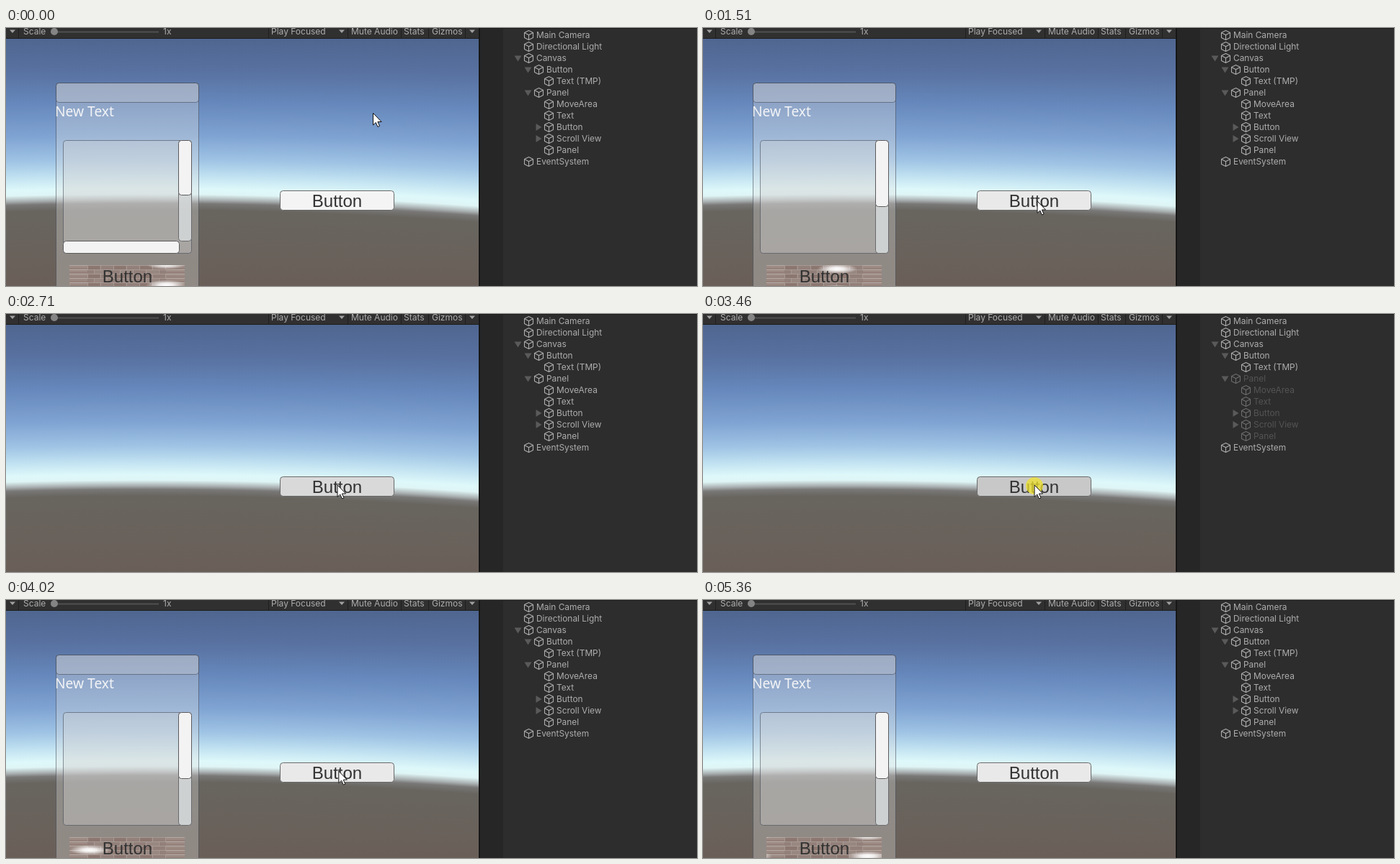
An HTML page with a canvas that plays this animation: 959 px wide and 359 px high, repeating every 5.43 s.

```html
<!DOCTYPE html>
<html lang="en">
<head>
<meta charset="utf-8">
<title>Panel toggle</title>
<style>
  html, body { margin: 0; width: 100%; height: 100%; overflow: hidden; background: #2d2d2d; }
  canvas, svg { position: absolute; left: 0; top: 0; display: block; }
  .ui { font: 12px Inter, sans-serif; fill: #adadad; }
  .tree { font-size: 11.9px; }
  .label { font: 24px "Liberation Sans", Arial, sans-serif; fill: #323232; text-anchor: middle; }
  .title { font: 300 19.2px "Noto Sans", sans-serif; fill: #f2f4f6; }
  .cube { fill: none; stroke: #adadad; stroke-width: 1.1; stroke-linejoin: round; }
  .tri { fill: #5a5a5a; }
  .off text { fill: #545454; }
  .off .cube { stroke: #6c6c6c; }
  .edge { stroke: #3c4450; stroke-opacity: .55; }
  .bar { fill: #f4f3f4; stroke: #5a5a5c; }
  .track { fill: #d3d6d6; fill-opacity: .9; stroke: #6a6a6c; }
</style>
</head>
<body>
<canvas id="sky" width="656" height="359"></canvas>
<svg width="959" height="359" viewBox="0 0 959 359">
  <defs>
    <radialGradient id="shine">
      <stop offset="0" stop-color="#fff"/>
      <stop offset=".35" stop-color="#fff" stop-opacity=".85"/>
      <stop offset="1" stop-color="#fff" stop-opacity="0"/>
    </radialGradient>
    <pattern id="bricks" x="113" y="330" width="36" height="12" patternUnits="userSpaceOnUse">
      <rect width="36" height="12" fill="#93807a"/>
      <rect x="1" y="1" width="16" height="5" fill="#8c7770"/>
      <rect x="10" y="7" width="16" height="5" fill="#998882"/>
      <path d="M0 .5H36M0 6.5H36M.5 0V6M18.5 0V6M9.5 6V12M27.5 6V12" stroke="#ada19a" stroke-opacity=".75"/>
    </pattern>
    <pattern id="planks" x="88" y="330" width="30" height="6" patternUnits="userSpaceOnUse">
      <rect width="30" height="6" fill="#9c8a83"/>
      <path d="M0 .5H30" stroke="#b3a8a2"/>
      <path d="M0 4.5H30" stroke="#917d76"/>
    </pattern>
    <clipPath id="face"><rect x="88" y="330" width="160" height="29"/></clipPath>
  </defs>

  <g id="panel">
    <rect class="edge" x="69.5" y="76.5" width="198" height="300" rx="4" fill="#dcdcdc" fill-opacity=".33"/>
    <rect class="edge" x="69.5" y="76.5" width="198" height="27" rx="4" fill="#d2d2d2" fill-opacity=".3"/>
    <text class="title" x="68" y="123">New Text</text>
    <rect class="edge" x="79.5" y="156.5" width="178" height="157" rx="4" fill="#d2d2d2" fill-opacity=".36"/>
    <rect id="track" class="track" x="239.5" y="156.5" width="18" height="157" rx="4"/>
    <rect id="vbar" class="bar" x="239.5" y="156.5" width="18" height="92" rx="4"/>
    <rect id="hbar" class="bar" x="79.5" y="296.5" width="161" height="17" rx="4"/>
    <g clip-path="url(#face)">
      <rect x="88" y="330" width="160" height="29" fill="url(#planks)"/>
      <rect x="113" y="330" width="109" height="29" fill="url(#bricks)"/>
      <g id="glare"></g>
    </g>
    <text class="label" x="168.5" y="353.5">Button</text>
  </g>

  <rect id="button" x="380.5" y="226.5" width="158" height="27" rx="4" stroke="#68696a"/>
  <text class="label" x="459.5" y="248.5">Button</text>

  <rect width="656" height="14" fill="#303030"/>
  <rect y="14" width="656" height="1" fill="#1e1e1e"/>
  <path d="M17.5 0V14M364.5 0V14M474.5 0V14M548.5 0V14M586.5 0V14M637.5 0V14" stroke="#1f1f1f"/>
  <path d="M5 2.5h8l-4 4.5zM462 2.5h8l-4 4.5zM643 2.5h8l-4 4.5z" fill="#a0a0a0"/>
  <path d="M62 5.5H212" stroke="#505050" stroke-width="2"/>
  <circle cx="67" cy="5" r="5" fill="#848484"/>
  <g id="tools" class="ui"></g>

  <rect x="656" width="303" height="359" fill="#2d2d2d"/>
  <rect x="656" width="34" height="359" fill="#262626"/>
  <rect x="656" width="2" height="359" fill="#171717"/>
  <rect x="658" width="301" height="1" fill="#1c1c1c"/>
  <g id="tree" class="ui tree"></g>

  <circle id="click" cx="460" cy="239" r="12" fill="#efe22c" fill-opacity=".75"/>
  <path id="cursor" d="M0 0V16.5L3.8 13 6.4 19 9 17.9 6.4 12H11.6Z" fill="#fff" stroke="#111" stroke-linejoin="round"/>
</svg>
<script>
const LOOP = 5430, HOLD = 530, RESUME = 3390, STEP = 70.35;
const $ = id => document.getElementById(id);

function add(parent, tag, attrs, text) {
  const el = document.createElementNS('http://www.w3.org/2000/svg', tag);
  for (const k in attrs) el.setAttribute(k, attrs[k]);
  if (text) el.textContent = text;
  return parent.appendChild(el);
}

// Sky and ground follow a slightly curved horizon.
function drawSky() {
  const ctx = $('sky').getContext('2d');
  const sky = [[0, '#4f6690'], [.2, '#5871a0'], [.4, '#6688bc'], [.6, '#7fa3d2'],
    [.75, '#9ec3e4'], [.86, '#c4e4f2'], [.93, '#def8fa'], [.965, '#dff5f6'], [1, '#a9afb0']];
  for (let x = 0; x < 656; x++) {
    const h = 239 + 8e-5 * (x - 190) ** 2;
    const g = ctx.createLinearGradient(0, 15, 0, 359);
    const stop = (y, c) => g.addColorStop((y - 15) / 344, c);
    for (const [f, c] of sky) stop(15 + (h - 15) * f, c);
    stop(h + 5, '#797877');
    stop(h + 14, '#68655f');
    stop(359, '#6a5f58');
    ctx.fillStyle = g;
    ctx.fillRect(x, 15, 1, 344);
  }
}

function buildTools() {
  const items = [[24, 'Scale'], [218, '1x'], [368, 'Play Focused'], [479, 'Mute Audio'], [552, 'Stats'], [591, 'Gizmos']];
  for (const [x, s] of items) add($('tools'), 'text', { x, y: 9 }, s);
}

// Each row: depth, name, arrow (v open, > closed), belongs to the toggled panel.
function buildTree() {
  const rows = [
    [0, 'Main Camera'], [0, 'Directional Light'], [0, 'Canvas', 'v'], [1, 'Button', 'v'], [2, 'Text (TMP)'],
    [1, 'Panel', 'v', 1], [2, 'MoveArea', '', 1], [2, 'Text', '', 1], [2, 'Button', '>', 1],
    [2, 'Scroll View', '>', 1], [2, 'Panel', '', 1], [0, 'EventSystem']
  ];
  const arrows = { v: 'M-5 -3.5H5L0 4.5Z', '>': 'M-3 -5V5L5 0Z' };
  rows.forEach(([depth, name, arrow, member], i) => {
    const row = add($('tree'), 'g', { transform: `translate(${725.5 + 14 * depth} ${10 + 16 * i})` });
    if (member) row.classList.add('member');
    add(row, 'path', { class: 'cube', d: 'M0 -6.5L6 -3.5V3.5L0 6.5L-6 3.5V-3.5ZM-6 -3.5L0 -.3L6 -3.5M0 -.3V6.5' });
    add(row, 'text', { x: 10.5, y: 4 }, name);
    if (arrow) add(row, 'path', { class: 'tri', d: arrows[arrow], transform: 'translate(-15 0)' });
  });
}

// Linear interpolation over rows of [time, ...values].
function at(keys, t) {
  let i = keys.findIndex(k => k[0] > t);
  if (i < 0) return keys[keys.length - 1].slice(1);
  i = Math.max(i, 1);
  const a = keys[i - 1], b = keys[i], f = (t - a[0]) / (b[0] - a[0]);
  return a.slice(1).map((v, n) => v + (b[n + 1] - v) * f);
}

const pointer = [[0, 509.5, 118.5], [530, 509.5, 118.5], [740, 504, 150], [880, 491, 188], [1020, 478, 221],
  [1230, 464, 241], [1650, 464, 241], [1860, 460, 238], [4020, 460, 238], [4160, 540, 246],
  [4300, 690, 256], [4450, 807, 260], [4660, 872, 290], [4800, 879, 325], [4940, 878, 362]];
const tint = [[0, 244], [1020, 244], [1160, 233], [2430, 233], [2570, 200], [2640, 200], [2780, 233],
  [3390, 233], [3460, 200], [3600, 200], [3740, 233]];
const between = (t, a, b) => t >= a && t < b;
const show = (el, on) => el.style.display = on ? '' : 'none';

drawSky();
buildTools();
buildTree();
const members = document.querySelectorAll('.member');
const shines = Array.from({ length: 9 }, () => add($('glare'), 'ellipse', { rx: 28, ry: 7, fill: 'url(#shine)' }));

function snap(t) {
  if (t < HOLD) return 0;
  const base = t < RESUME ? HOLD : RESUME;
  return base + Math.floor((t - base + 8) / STEP) * STEP;
}

function render(time) {
  const t = snap(time);

  // The highlight scrolls left and down, wrapping like a tiled texture.
  const turn = t < HOLD ? .78 : .972 * (t - 1510) / 1000 + 2;
  const phase = turn % 1;
  shines.forEach((s, i) => {
    s.setAttribute('cx', 187 - 160 * phase + 160 * (i % 3 - 1));
    s.setAttribute('cy', 335 + 29 * phase + 29 * (Math.floor(i / 3) - 1));
  });

  const first = t < HOLD;
  show($('hbar'), first);
  $('vbar').setAttribute('height', first ? 76 : 92);
  $('track').setAttribute('height', first ? 140 : 157);

  show($('panel'), !between(t, 2640, 3600));
  members.forEach(m => m.classList.toggle('off', between(t, 2780, 3670)));
  show($('click'), between(t, 2500, 2640) || between(t, 3390, 3600));

  const c = Math.round(at(tint, t)[0]);
  $('button').setAttribute('fill', `rgb(${c},${c},${c})`);
  $('cursor').setAttribute('transform', `translate(${at(pointer, t).join(' ')})`);
}

const start = performance.now();
function tick() {
  render((performance.now() - start) % LOOP);
  requestAnimationFrame(tick);
}
tick();
</script>
</body>
</html>
```
